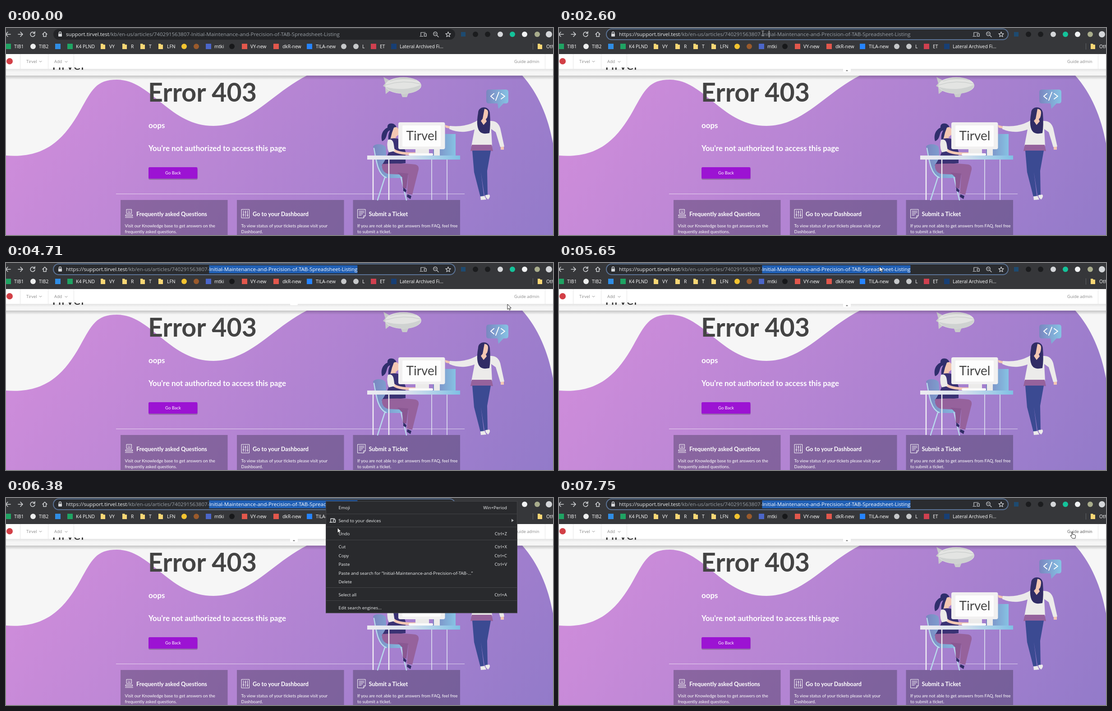
An HTML page for the animation above (8 s loop, 1213 px wide and 461 px high).

```html
<!DOCTYPE html>
<html lang="en">
<head>
<meta charset="utf-8">
<title>Support page</title>
<style>
  html, body { margin: 0; width: 100%; height: 100%; overflow: hidden; background: #f6f6f6; }
  svg { display: block; width: 1213px; height: 461px; }
  text { white-space: pre; }
  .ui { font-family: "Open Sans", "Noto Sans", sans-serif; }
  .page { font-family: Lato, "Open Sans", sans-serif; }
  .line { fill: none; stroke-linecap: round; stroke-linejoin: round; }
</style>
</head>
<body>
<svg viewBox="0 0 1213 461">
  <defs>
    <linearGradient id="purple" gradientUnits="userSpaceOnUse" x1="130" y1="120" x2="1130" y2="820">
      <stop stop-color="#cd8cda"/><stop offset="1" stop-color="#8b78c7"/>
    </linearGradient>
    <linearGradient id="blue"><stop stop-color="#7a86c0"/><stop offset="1" stop-color="#86c3e4"/></linearGradient>
    <linearGradient id="desk"><stop stop-color="#ecebf0"/><stop offset=".45" stop-color="#d9e2ee"/><stop offset="1" stop-color="#7fc0e4"/></linearGradient>
    <linearGradient id="shade" x2="0" y2="1"><stop stop-opacity=".2"/><stop offset="1" stop-opacity="0"/></linearGradient>
    <clipPath id="logoClip"><rect x="90" y="88" width="100" height="5"/></clipPath>
    <clipPath id="selClip"><rect id="selClipBox" y="5" width="0" height="18"/></clipPath>
  </defs>

  <!-- page -->
  <g class="page">
    <path fill="url(#purple)" d="M0 284C85 291 128 250 165 183C190 138 200 115 246 115C322 115 362 218 460 218C541 218 590 145 667 106H1145C1180 145 1203 200 1213 257V461H0Z"/>
    <text x="315" y="164" font-size="57.300" font-weight="700" fill="#444">Error 403</text>
    <g fill="#fff" font-size="16.900" font-weight="700">
      <text x="316" y="223">oops</text>
      <text x="316" y="274">You're not authorized to access this page</text>
    </g>
    <rect x="316" y="313" width="109" height="25" rx="3" opacity=".2"/>
    <rect x="316" y="310" width="108.500" height="25.500" rx="2.500" fill="#9c13d3"/>
    <text x="370.500" y="325.500" font-size="9.500" fill="#fff" text-anchor="middle">Go Back</text>
    <path d="M244 369.500H1017" stroke="#fff" opacity=".65"/>
    <g id="cards"></g>
  </g>

  <!-- airship and speech bubble -->
  <path fill="#c9cccb" d="M837 109L859 121L856 136L842 147L841 132L836 129L841 123ZM875 144H893L889 154H879Z"/>
  <ellipse cx="881" cy="128" rx="40" ry="18.500" fill="#e3e4e2"/>
  <path fill="#cfd2d1" d="M842 131C870 139 897 137 921 126C918 142 897 147 878 146C860 145 848 139 842 131Z"/>
  <path class="line" stroke="#c3c7c6" d="M842 127Q882 114 920 125M852 118Q880 108 909 116"/>
  <path fill="url(#blue)" d="M1071 137H1108Q1114 137 1114 143V162Q1114 168 1108 168H1103L1092 180L1090 168H1071Q1065 168 1065 162V143Q1065 137 1071 137Z"/>
  <path class="line" stroke="#fff" stroke-width="2" d="M1082 146L1075 152L1082 158M1093 143L1086 161M1098 146L1106 152L1098 158"/>

  <!-- seated woman -->
  <path fill="#2f2e6c" d="M846 222C844 209 864 210 866 222L860 241L848 249C847 240 849 233 852 228C841 230 848 247 834 252C830 238 836 226 846 222Z"/>
  <path fill="#f3c7b3" d="M860 222C868 218 873 224 870 238L864 243L866 249H852L856 233Z"/>
  <path fill="url(#blue)" d="M814 264C820 255 841 259 842 267L846 324H888Q891 333 880 334H843C824 331 819 292 814 264Z"/>
  <path class="line" stroke="#b9d9ec" stroke-width="2.500" d="M816 268C822 303 826 326 843 333M840 333L824 383M876 333L888 383"/>
  <path fill="#3a3274" d="M848 248Q864 242 878 251L886 275V301L833 306Q842 294 848 278Z"/>
  <path class="line" stroke="#f3c7b3" stroke-width="6" d="M858 270Q868 281 908 280"/>
  <path fill="#ecebea" d="M847 249Q858 245 860 260L862 274L849 277Q843 263 847 249Z"/>
  <path fill="#96629c" d="M834 303Q875 300 908 304Q918 307 914 319L901 371L889 369L892 327L847 325Q832 320 834 303Z"/>
  <path fill="#8a5892" d="M868 322L892 324L888 358L880 356L879 333Z"/>
  <path fill="#312d66" d="M881 355L888 361L887 366L881 363ZM890 370L899 374L897 381L889 376Z"/>

  <!-- desk and screen -->
  <path fill="url(#blue)" d="M947 236H997V285H947Z"/>
  <path fill="#ecebea" d="M908 269H938V281H908ZM949 270H962V285H949Z"/>
  <rect x="893" y="279" width="54" height="5" rx="2.500" fill="#fafafa"/>
  <rect x="870" y="210" width="103.500" height="60" rx="4" fill="#f1f0f0"/>
  <rect x="879" y="217" width="85" height="47" rx="2" fill="#fdfdfd"/>
  <text class="page" x="922" y="250" font-size="28" fill="#444" text-anchor="middle">Tirvel</text>
  <rect x="801" y="284" width="206" height="9" fill="url(#desk)"/>
  <path stroke="#f1f0f4" stroke-width="2.500" d="M814 293V383M849 293V383"/>
  <path stroke="#e3ebf5" stroke-width="1.500" d="M944 293V383M978 293V383"/>

  <!-- standing woman -->
  <path fill="#f3c7b3" d="M973 216L985 219V224L975 222ZM1097 262H1104V271H1097Z"/>
  <path fill="#ecebea" d="M1047 205L1076 207Q1091 207 1096 223L1105 264L1096 265L1086 232L1076 225L1078 263H1032L1039 226Q1010 237 983 225L984 218Q1020 222 1047 205Z"/>
  <path fill="#96629c" d="M1033 260H1077L1080 274H1030Z"/>
  <path fill="#3b4a92" d="M1034 273H1075L1067 318L1068 372L1061 373L1053 320L1060 376L1052 376L1038 321Z"/>
  <path fill="#ecebea" d="M1052 375L1061 374L1065 382L1053 383ZM1063 372L1072 371Q1075 376 1069 382L1064 377Z"/>
  <path fill="#312d66" d="M1047 189C1047 173 1072 172 1073 190Q1075 217 1072 234Q1058 237 1052 232Q1041 222 1047 189Z"/>
  <path fill="#f3c7b3" d="M1061 180Q1070 181 1069 190Q1068 201 1064 203L1066 208L1059 216L1053 207L1057 202Z"/>

  <!-- site header -->
  <rect y="91" width="1213" height="15" fill="#f6f6f6"/>
  <rect y="106" width="1213" height="9" fill="url(#shade)"/>
  <rect y="57" width="1213" height="34" fill="#fff"/>
  <rect y="91" width="1213" height="7" fill="url(#shade)" opacity=".4"/>
  <path stroke="#e6e6e6" d="M0 91.500H1213M31.500 57V91M93.500 57V91M150.500 57V91M1195.500 57V91"/>
  <text class="page" x="97" y="92.500" font-size="31" fill="#333" clip-path="url(#logoClip)">Tirvel</text>
  <circle cx="8" cy="74" r="7" fill="#d23f46"/>
  <g class="ui" font-size="9.300" fill="#888">
    <text x="45" y="78">Tirvel</text><text x="107" y="78">Add</text>
    <text id="admin" x="1127" y="78">Guide admin</text>
  </g>
  <path class="line" stroke="#888" d="M74 73.500L76.500 76L79 73.500M131 74L133.500 76.500L136 74"/>
  <g id="tab">
    <path fill="#fff" d="M630 91H647V96Q647 98 645 98H632Q630 98 630 96Z"/>
    <path id="tabArrow" fill="#777" d="M636 96H641L638.500 93Z"/>
  </g>

  <!-- browser -->
  <rect width="1213" height="58" fill="#36373a"/>
  <rect id="pill" x="105" y="2" width="891" height="24" rx="12" stroke-width="2"/>
  <g class="line" stroke="#d5d7da" stroke-width="1.500">
    <path d="M0 14H10M-1 14L4 9M-1 14L4 19M27 14H37M32 9L37 14L32 19"/>
    <path d="M63 11A5 5 0 1 0 64 15M64 8V12H60M81 14L86 9L91 14M83 13V19H89V13"/>
    <path stroke-width="1.200" d="M920 17V10H930M918 18.500H925M927.500 12.500H932V18.500H927.500ZM955.500 16.500L959 20M950 13H954M980.500 8.500L982 12.500L986 12.700L983 15.300L984 19.500L980.500 17.200L977 19.500L978 15.300L975 12.700L979 12.500Z"/>
    <circle cx="952" cy="13" r="4.200" stroke-width="1.200"/>
    <path stroke-width="1.300" d="M117.500 13V11A2.500 2.500 0 0 1 122.500 11V13"/>
  </g>
  <rect x="116" y="12.500" width="8" height="6.500" rx="1" fill="#d5d7da"/>
  <g id="icons"></g>
  <g id="bookmarks" class="ui" font-size="10.400" fill="#fff"></g>
  <path stroke="#606266" d="M1168.500 34V48"/>

  <g class="ui" font-size="11.580">
    <text id="url" x="133" y="18" fill="#9aa0a6"><tspan id="scheme" fill="#e8eaed"></tspan><tspan fill="#f1f3f4">support.tirvel.test</tspan>/kb/en-us/articles/740291563807-<tspan id="slug">Initial-Maintenance-and-Precision-of-TAB-Spreadsheet-Listing</tspan></text>
    <g clip-path="url(#selClip)">
      <rect x="400" y="5" width="500" height="18" fill="#205fb4"/>
      <text id="selText" y="18" fill="#fff"></text>
    </g>
  </g>
  <rect id="caret" y="6" width="1" height="15" fill="#fff"/>

  <g id="menu" class="ui" font-size="9.750" fill="#f1f3f4">
    <rect x="709.500" y="7.500" width="424" height="248.500" fill="#292a2d" stroke="#434447"/>
    <rect id="hover" x="710" width="423" height="20" fill="#4b4c4f"/>
    <path stroke="#434447" d="M710 35.500H1133M710 64.500H1133M710 93.500H1133M710 199.500H1133M710 228.500H1133"/>
    <path class="line" stroke="#e8eaed" stroke-width="1.300" d="M720 53V46H729M718 54H724M726 48.500H730.500V54H726Z"/>
    <path fill="#b0b2b5" d="M1121 46.500L1126 50L1121 53.500Z"/>
    <g id="items"></g>
  </g>

  <g id="pointer">
    <path id="arrow" fill="#fff" stroke="#111" stroke-width=".9" d="M0 0V11.500L2.700 9L4.500 13L6.500 12L4.700 8.200H8.300Z"/>
    <path id="beam" class="line" stroke="#b8babd" d="M-2.500 -5.500H-.5L0 -5L.5 -5.500H2.500M0 -5V5M-2.500 5.500H-.5L0 5L.5 5.500H2.500"/>
    <path id="hand" fill="#fff" stroke="#111" stroke-width=".9" stroke-linejoin="round" d="M-1 1Q0 -1 1 1V6L6 7Q8 7.500 7.500 10L6.500 15H.5L-4 9Q-4 7 -1 9Z"/>
  </g>
</svg>

<script>
const $ = id => document.getElementById(id);
const show = (id, on) => $(id).style.display = on ? '' : 'none';
const text = (x, y, s, more = '') => `<text x="${x}" y="${y}" ${more}>${s}</text>`;
const dot = (x, y, r, c) => `<circle cx="${x}" cy="${y}" r="${r}" fill="${c}"/>`;
const square = (x, y, r, c) => `<rect x="${x - r}" y="${y - r}" width="${2 * r}" height="${2 * r}" fill="${c}"/>`;
const folder = (x, y) => `<path fill="#f8d775" d="M${x - 5} ${y - 6}h5l1 2h4v10h-10Z"/>`;

// cards: left edge, title, two lines, icon outline
$('cards').innerHTML = [
  [254, 'Frequently asked Questions', 'Visit our Knowledge base to get answers on the', 'frequently asked questions.',
    'M4 1H15V10H4ZM7 4H8M11 4H12M7 7H12M2 13H17V16H2ZM1 19H18'],
  [512, 'Go to your Dashboard', 'To view status of your tickets please visit your', 'Dashboard.',
    'M1 1H18V20H1ZM5 4V17M9.500 4V17M14 4V17M3.500 13H6.500M8 7H11M12.500 14H15.500'],
  [769.5, 'Submit a Ticket', 'If you are not able to get answers from FAQ, feel free', 'to submit a ticket.',
    'M1 1H18V15L14 20H1ZM18 15H14V20M4 5H15M4 8H15M4 11H12M4 14H9']
].map(([x, title, a, b, icon]) => `
  <rect x="${x}" y="383" width="237.5" height="78" fill="#3c3250" opacity=".4"/>
  <path class="line" stroke="#fff" transform="translate(${x + 9.5} 403)" d="${icon}"/>
  <g fill="#fff">${text(x + 35, 418.5, title, 'font-size="12.7" font-weight="700"')}
  <g font-size="9.6">${text(x + 9.5, 444, a)}${text(x + 9.5, 457, b)}</g></g>`).join('');

$('icons').innerHTML = square(1014, 14, 5, '#1d4a70') +
  [[1041, '#1b1c1e'], [1068, '#1b1c1e'], [1096, '#d5d7da'], [1123, '#14c39a'], [1150, '#f1f3f4'], [1178, '#a9ad8c'], [1204, '#d5d7da']]
    .map(([x, c]) => dot(x, 14, x === 1204 ? 7 : 6, c)).join('');

// bookmarks: icon centre, shape, colour, label position, label
$('bookmarks').innerHTML = [
  [5, square, '#1fa463', 18, 'TIB1'], [60, dot, '#eceded', 73, 'TIB2'], [115, square, '#2f8de4'],
  [142, square, '#1fa463', 155, 'K4 PLND'], [215, folder, '', 229, 'VY'], [263, folder, '', 277, 'R'],
  [303, folder, '', 317, 'T'], [343, folder, '', 357, 'LFN'], [395, dot, '#f4c430'], [422, dot, '#9a5a2c'],
  [449, square, '#4b66c9', 462, 'mtki'], [501, dot, '#17181a'], [529, square, '#e2574c', 542, 'VY-new'],
  [599, square, '#e2574c', 613, 'dkR-new'], [673, square, '#2684ff', 687, 'TILA-new'], [749, dot, '#c6c8ca'],
  [776, dot, '#c6c8ca', 790, 'L'], [815, square, '#d0404f', 829, 'ET'],
  [860, square, '#173f75', 873, 'Lateral Archived Fi...'], [1184, folder, '', 1198, 'Other bookmarks']
].map(([x, shape, c, tx, label]) =>
  (shape === folder ? folder(x, 41) : shape(x, 41, 6, c)) + (label ? text(tx, 45, label) : '')).join('');

const items = [
  [21, 'Emoji', 'Win+Period'], [50, 'Send to your devices', ''], [79, 'Undo', 'Ctrl+Z'], [108, 'Cut', 'Ctrl+X'],
  [127.5, 'Copy', 'Ctrl+C'], [147, 'Paste', 'Ctrl+V'],
  [166.5, 'Paste and search for “Initial-Maintenance-and-Precision-of-TAB-...”', ''],
  [186, 'Delete', ''], [214.5, 'Select all', 'Ctrl+A'], [243.5, 'Edit search engines...', '']
];
$('items').innerHTML = items.map(([y, label, key]) =>
  text(737.5, y + 4, label) + text(1111, y + 4, key, 'text-anchor="end"')).join('');

// pointer path: time, x, y
const path = [
  [290, 640, 132], [420, 585, 95], [680, 417, 32], [830, 417, 32], [1000, 424, 20], [1200, 427, 14],
  [1600, 427, 14], [1750, 421, 13], [1830, 445, 13], [1980, 446, 13], [2210, 453, 13], [2520, 453, 13],
  [2600, 452, 12], [3210, 455, 12], [3520, 783, 6], [3700, 800, 12], [4010, 812, 80], [4100, 860, 112],
  [4350, 1040, 132], [4550, 1130, 118], [4710, 1112, 92], [4890, 1116, 74], [4960, 1060, 50], [5040, 913, 6],
  [5330, 711, 3], [5590, 711, 3], [5650, 711, 8], [6150, 712, 10], [6600, 757, 120], [6980, 757, 120],
  [7250, 940, 130], [7500, 1090, 100], [7670, 1134, 78], [7750, 1138, 75]
];
const selection = [[3210, 0], [3520, .98], [3600, 1]];

function at(keys, t) {
  const i = keys.findIndex(k => k[0] > t);
  if (i < 0) return keys.at(-1).slice(1);
  if (i === 0) return keys[0].slice(1);
  const a = keys[i - 1], b = keys[i], f = (t - a[0]) / (b[0] - a[0]);
  return a.slice(1).map((v, n) => v + (b[n + 1] - v) * f);
}
const within = (t, a, b) => t >= a && t < b;

$('scheme').textContent = 'https://';
const slug = $('slug').textContent;
const slugX = $('slug').getStartPositionOfChar(0).x;
const slugWidth = 133 + $('url').getComputedTextLength() - slugX;
$('selText').textContent = slug;
$('selText').setAttribute('x', slugX);
$('selClipBox').setAttribute('x', slugX);

function draw(t) {
  const focused = t >= 1380, open = within(t, 5900, 6980);
  const [x, y] = at(path, t);

  $('scheme').textContent = focused ? 'https://' : '';
  $('pill').setAttribute('stroke', focused ? '#5b7395' : 'none');
  $('pill').setAttribute('fill', focused ? '#2a2c30' : '#232427');
  $('selClipBox').setAttribute('width', at(selection, t)[0] * slugWidth);
  show('caret', within(t, 1380, 1830) || within(t, 2370, 3210));
  $('caret').setAttribute('x', slugX + (t < 2750 ? 15 : 0));

  const dip = within(t, 4640, 4890) || within(t, 7420, 7590);
  show('tab', t >= 290);
  show('tabArrow', !dip);
  $('tab').setAttribute('transform', `translate(0 ${dip ? -4 : 0})`);
  $('admin').setAttribute('fill', t >= 7750 ? '#555' : '#888');

  const row = open && t >= 6150 && items.find(i => Math.abs(i[0] - y) < 10);
  show('menu', open);
  show('hover', row);
  if (row) $('hover').setAttribute('y', row[0] - 10.5);

  const hand = t >= 7670, beam = y < 27 && t < 5040;
  show('pointer', t >= 290 && !within(t, 5040, 5330));
  show('arrow', !hand && !beam);
  show('beam', beam);
  show('hand', hand);
  $('pointer').setAttribute('transform', `translate(${x.toFixed(1)} ${y.toFixed(1)})`);
}

function loop(now) {
  draw(now % 8000);
  requestAnimationFrame(loop);
}
requestAnimationFrame(loop);
</script>
</body>
</html>
```
